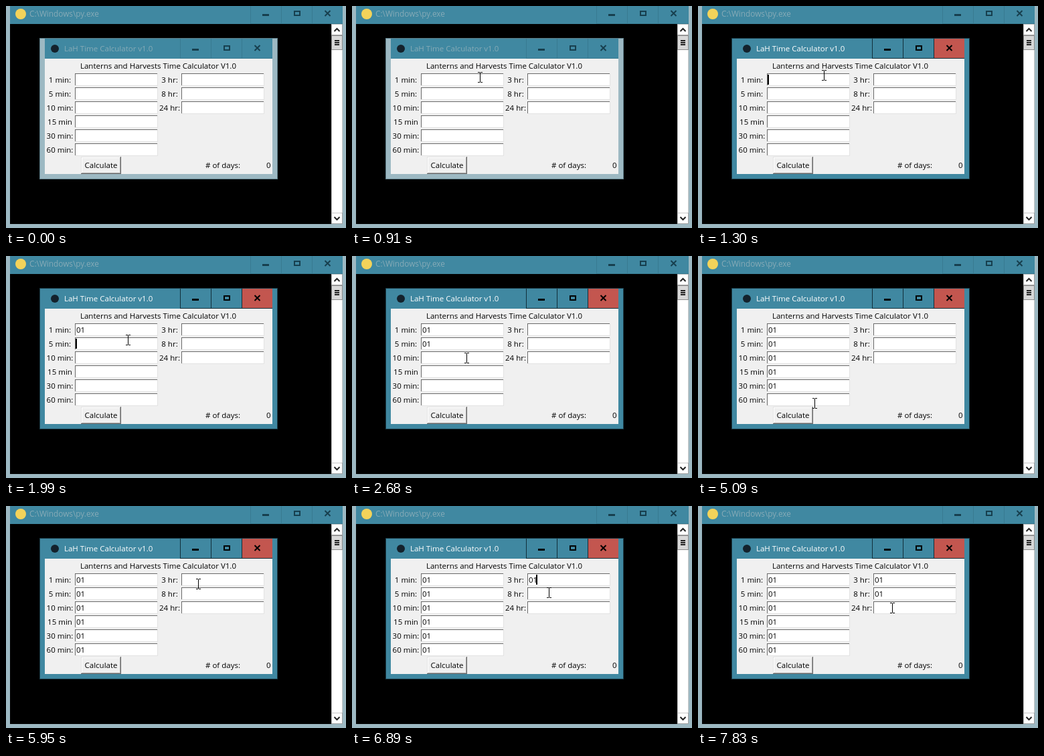
These frames come from a looping animation (508x333 px, 8000 ms). An HTML page with a canvas:

```html
<!DOCTYPE html>
<html lang="en">
<head>
<meta charset="utf-8">
<title>Time Calculator</title>
<style>
html, body { margin: 0; width: 100%; height: 100%; overflow: hidden; background: #9db9c3; }
canvas { display: block; }
</style>
</head>
<body>
<canvas id="stage" width="508" height="333"></canvas>
<script>
const ctx = document.getElementById('stage').getContext('2d');
const LOOP = 8000;
const TEAL = '#4088a1', PALE = '#9db9c3', FACE = '#f0f0f0', FADED = '#86abb7';
const FIELD_WIDTH = 124, FIELD_HEIGHT = 19, ROWS = 6;

// Each visit: click time, then where the pointer rests. One visit per field.
const visits = [
  [1220, 188, 104], [1990, 182, 126], [2850, 171, 153],
  [3610, 174, 174], [4480, 174, 191], [5260, 174, 221],
  [6350, 294, 110], [7200, 294, 131], [LOOP, 290, 153]
].map(([click, x, y]) => ({ click, x, y }));

const labels = ['1 min:', '5 min:', '10 min:', '15 min', '30 min:', '60 min:', '3 hr:', '8 hr:', '24 hr:'];
const fields = labels.map((label, i) => {
  const column = Math.floor(i / ROWS);
  return { label, x: 103 + 159 * column, y: 101 + 21 * (i % ROWS), labelX: 80.5 + 164 * column };
});

// Rhythm around every click: settle before it, type two digits after it, move on.
const SETTLE = 150, DIGIT_DELAY = 150, BLINK_ON = 600, BLINK_PERIOD = 900;
const pointerStart = { click: 460 - 2 * DIGIT_DELAY, x: 365, y: 266 };

function box(x, y, w, h, color) {
  ctx.fillStyle = color;
  ctx.fillRect(x, y, w, h);
}

function bevel(x, y, w, h, topLeft, bottomRight) {
  box(x, y, w, 1, topLeft);
  box(x, y, 1, h, topLeft);
  box(x, y + h - 1, w, 1, bottomRight);
  box(x + w - 1, y, 1, h, bottomRight);
}

function text(str, x, y, color = '#000', align = 'left', size = 11.5) {
  ctx.font = `${size}px "Open Sans", "Noto Sans", sans-serif`;
  ctx.textAlign = align;
  ctx.fillStyle = color;
  ctx.fillText(str, x, y);
}

function disc(x, y, r, color) {
  ctx.fillStyle = color;
  ctx.beginPath();
  ctx.arc(x, y, r, 0, Math.PI * 2);
  ctx.fill();
}

function stroke(path, color, width) {
  ctx.strokeStyle = color;
  ctx.lineWidth = width;
  ctx.stroke(new Path2D(path));
}

function captionButtons(left, top, height, active) {
  const ink = active ? '#000' : '#173f4e';
  const line = active ? '#122f3a' : '#387a91';
  if (active) box(left + 93, top, 45, height, '#c3564f');
  for (let i = 0; i < 3; i++) box(left + 46 * i, top, 1, height, line);
  box(left, top + height, 138, 1, line);
  const y = top + height - 19;
  box(left + 18, y + 5, 10, 3, ink);
  box(left + 65, y, 10, 8, ink);
  box(left + 67, y + 2, 6, 4, TEAL);
  stroke(`M${left + 111.5} ${y}l8 8m0 -8l-8 8`, ink, 2);
}

function drawConsole() {
  box(0, 0, 508, 333, PALE);
  box(6, 0, 497, 27, TEAL);
  disc(22, 12, 8, '#f3d35a');
  text('C:\\Windows\\py.exe', 35, 16, FADED, 'left', 11.8);
  captionButtons(365, 0, 26, false);
  box(6, 27, 480, 300, '#000');
  box(486, 27, 17, 300, '#fff');
  bevel(486, 27, 17, 300, '#c8c8c8', '#c8c8c8');
  bevel(486, 27, 17, 17, '#c8c8c8', '#a0a0a0');
  bevel(486, 310, 17, 17, '#c8c8c8', '#a0a0a0');
  stroke('M490.5 38l4 -4 4 4M490.5 316.5l4 4 4 -4', '#222', 2);
  box(486, 44, 17, 22, '#d8d8d8');
  bevel(486, 44, 17, 22, '#8c8c8c', '#8c8c8c');
  for (let y = 51; y < 60; y += 3) box(491, y, 7, 2, '#222');
}

function drawField({ label, x, y, labelX }, i, t) {
  text(label, labelX, y + 14, '#000', 'center');
  box(x, y, FIELD_WIDTH, FIELD_HEIGHT, '#fff');
  bevel(x, y, FIELD_WIDTH, FIELD_HEIGHT, '#696969', '#e3e3e3');
  const since = t - visits[i].click;
  const digits = Math.max(0, Math.floor(since / DIGIT_DELAY));
  const typed = '01'.slice(0, digits);
  text(typed, x + 2, y + 14);
  const focused = since >= 0 && t < (visits[i + 1]?.click ?? LOOP);
  if (focused && since % BLINK_PERIOD < BLINK_ON) {
    box(x + 1 + 6 * typed.length, y + 2, 2, 15, '#000');
  }
}

function drawCalculator(t) {
  const active = t >= visits[0].click;
  box(50, 48, 356, 212, active ? '#1b3c48' : '#5f7f8a');
  box(51, 49, 354, 210, active ? TEAL : PALE);
  box(58, 49, 340, 30, TEAL);
  disc(73, 64, 6, '#14222c');
  text('LaH Time Calculator v1.0', 87, 68, active ? '#fff' : FADED);
  captionButtons(260, 49, 29, active);
  box(58, 79, 340, 173, FACE);
  text('Lanterns and Harvests Time Calculator V1.0', 227.5, 94, '#000', 'center');
  fields.forEach((field, i) => drawField(field, i, t));
  bevel(112, 226, 60, 26, '#e3e3e3', '#696969');
  bevel(113, 227, 58, 24, '#fff', '#a0a0a0');
  text('Calculate', 142, 243, '#000', 'center');
  text('# of days:', 298, 243);
  text('0', 395.5, 243, '#000', 'right');
}

// After typing, the pointer glides to the next field and slows down on arrival.
function pointerAt(t) {
  const departure = visit => visit.click + 2 * DIGIT_DELAY;
  const stops = [pointerStart, ...visits];
  const from = stops.findLast(stop => t >= departure(stop));
  const to = stops[stops.indexOf(from) + 1];
  const start = departure(from);
  const progress = Math.min(1, (t - start) / (to.click - SETTLE - start));
  const eased = 1 - (1 - progress) ** 3;
  const mix = (a, b) => Math.round(a + (b - a) * eased);
  return [mix(from.x, to.x), mix(from.y, to.y)];
}

function drawTextPointer(x, y) {
  box(x, y - 7, 1, 14, '#000');
  for (const edge of [y - 8, y + 7]) {
    box(x - 3, edge, 3, 1, '#000');
    box(x + 1, edge, 3, 1, '#000');
  }
}

function drawArrow(x, y) {
  const arrow = new Path2D('M0 0V16L4 12.5 6.5 18 9 17 6.5 11.5H11.5Z');
  ctx.save();
  ctx.translate(x + 0.5, y + 0.5);
  ctx.fillStyle = '#fff';
  ctx.fill(arrow);
  ctx.strokeStyle = '#000';
  ctx.lineWidth = 1;
  ctx.stroke(arrow);
  ctx.restore();
}

function drawPointer(t) {
  if (t < departureOfPointer) return;
  const [x, y] = pointerAt(t);
  const overField = fields.some(f =>
    x >= f.x && x < f.x + FIELD_WIDTH && y >= f.y && y < f.y + FIELD_HEIGHT);
  (overField ? drawTextPointer : drawArrow)(x, y);
}

const departureOfPointer = pointerStart.click + 2 * DIGIT_DELAY;
const start = performance.now();

function render() {
  const t = (performance.now() - start) % LOOP;
  drawConsole();
  drawCalculator(t);
  drawPointer(t);
  requestAnimationFrame(render);
}
render();
</script>
</body>
</html>
```
